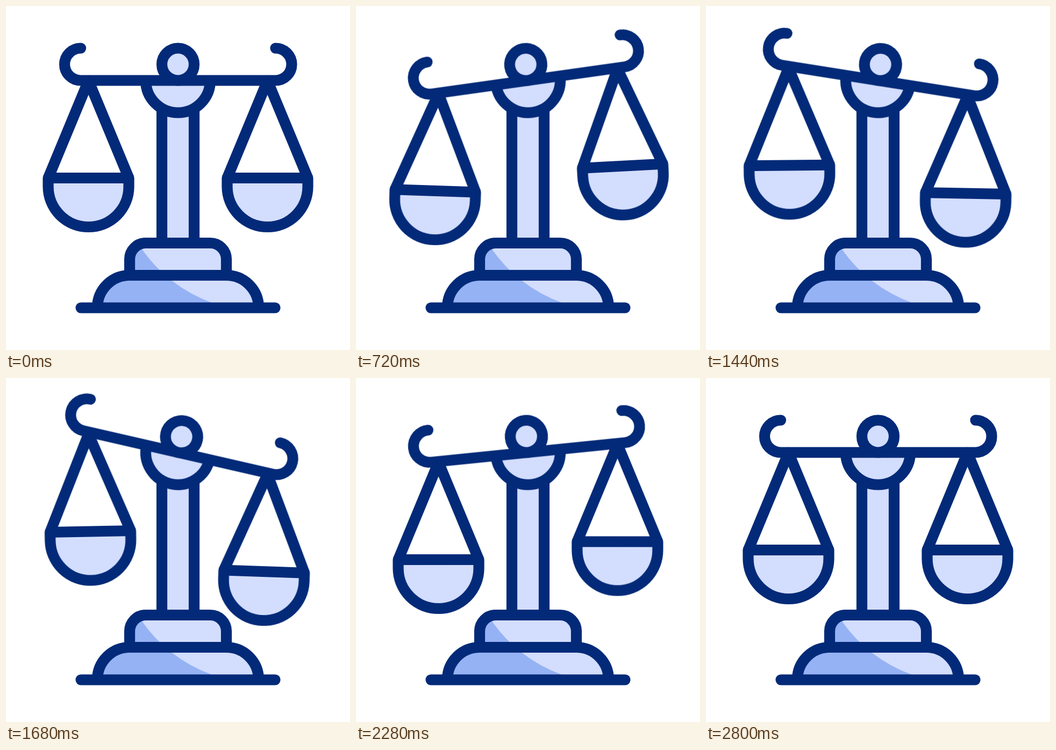
These frames come from a looping animation (640 by 640 pixels, 3 s). An HTML page:

```html
<!DOCTYPE html>
<html lang="en">
<head>
<meta charset="utf-8">
<title>Balance scale</title>
<style>
  html, body { margin: 0; width: 100%; height: 100%; overflow: hidden; background: #fff; }
  svg { display: block; width: 100vw; height: 100vh; }

  .line { fill: none; }
  .shade { fill: #95b2f4; stroke: none; }
  .plain { stroke: none; }

  .beam, .pan {
    animation: 3s cubic-bezier(.3333, 0, .6667, 1) infinite;
  }
  .beam { transform-origin: 320px 138.5px; animation-name: tilt; }
  .left { transform-origin: 153.5px 139px; animation-name: swing-left; }
  .right { transform-origin: 486.5px 139px; animation-name: swing-right; }

  @keyframes tilt {
    0%, 8%, 93.3333%, 100% { transform: rotate(0deg); }
    24% { transform: rotate(-8deg); }
    57.3333% { transform: rotate(13deg); }
    77.3333% { transform: rotate(-6deg); }
  }
  @keyframes swing-left {
    0%, 8%, 93.3333%, 100% { transform: translateY(0) rotate(0deg); }
    24% { transform: translateY(24px) rotate(1.9deg); }
    57.3333% { transform: translateY(-34.7px) rotate(-1.1deg); }
    77.3333% { transform: translateY(18.6px) rotate(0deg); }
  }
  @keyframes swing-right {
    0%, 8%, 93.3333%, 100% { transform: translateY(0) rotate(0deg); }
    24% { transform: translateY(-22px) rotate(-3deg); }
    57.3333% { transform: translateY(40.5px) rotate(2deg); }
    77.3333% { transform: translateY(-16.2px) rotate(0deg); }
  }
</style>
</head>
<body>
<svg viewBox="0 0 640 640" fill="#d3ddfe" stroke="#032a78" stroke-width="20.2" stroke-linejoin="round">
  <defs>
    <g id="pan">
      <path d="M-75 181H75V197a75 75 0 0 1-150 0Z"/>
      <path class="line" d="M-75 181L0 0L75 181"/>
    </g>
  </defs>

  <!-- column -->
  <path class="plain" d="M290 170H350V441H290Z"/>
  <path class="line" d="M290 180V441M350 180V441"/>

  <!-- base -->
  <path class="plain" d="M170 561A60 60 0 0 1 230 501V471A30 30 0 0 1 260 441H380A30 30 0 0 1 410 471V501A60 60 0 0 1 470 561Z"/>
  <path class="shade" d="M170 561A60 60 0 0 1 230 501V471A30 30 0 0 1 252 442V451A268 268 0 0 0 383 552V561Z"/>
  <path class="line" d="M230 501V471A30 30 0 0 1 260 441H380A30 30 0 0 1 410 471V501"/>
  <path class="line" d="M170 561A60 60 0 0 1 230 501H410A60 60 0 0 1 470 561"/>
  <path class="line" stroke-linecap="round" d="M139.5 561.5H500.5"/>

  <g class="beam">
    <path d="M260 138.5A60 60 0 0 0 380 138.5"/>
    <path class="line" stroke-linecap="round" d="M139 78.5a30 30 0 0 0 0 60H501.5a30 30 0 0 0 0-60"/>
    <circle cx="320" cy="108.5" r="30"/>
  </g>

  <g class="pan left"><use href="#pan" x="153.5" y="139"/></g>
  <g class="pan right"><use href="#pan" x="486.5" y="139"/></g>
</svg>
</body>
</html>
```
